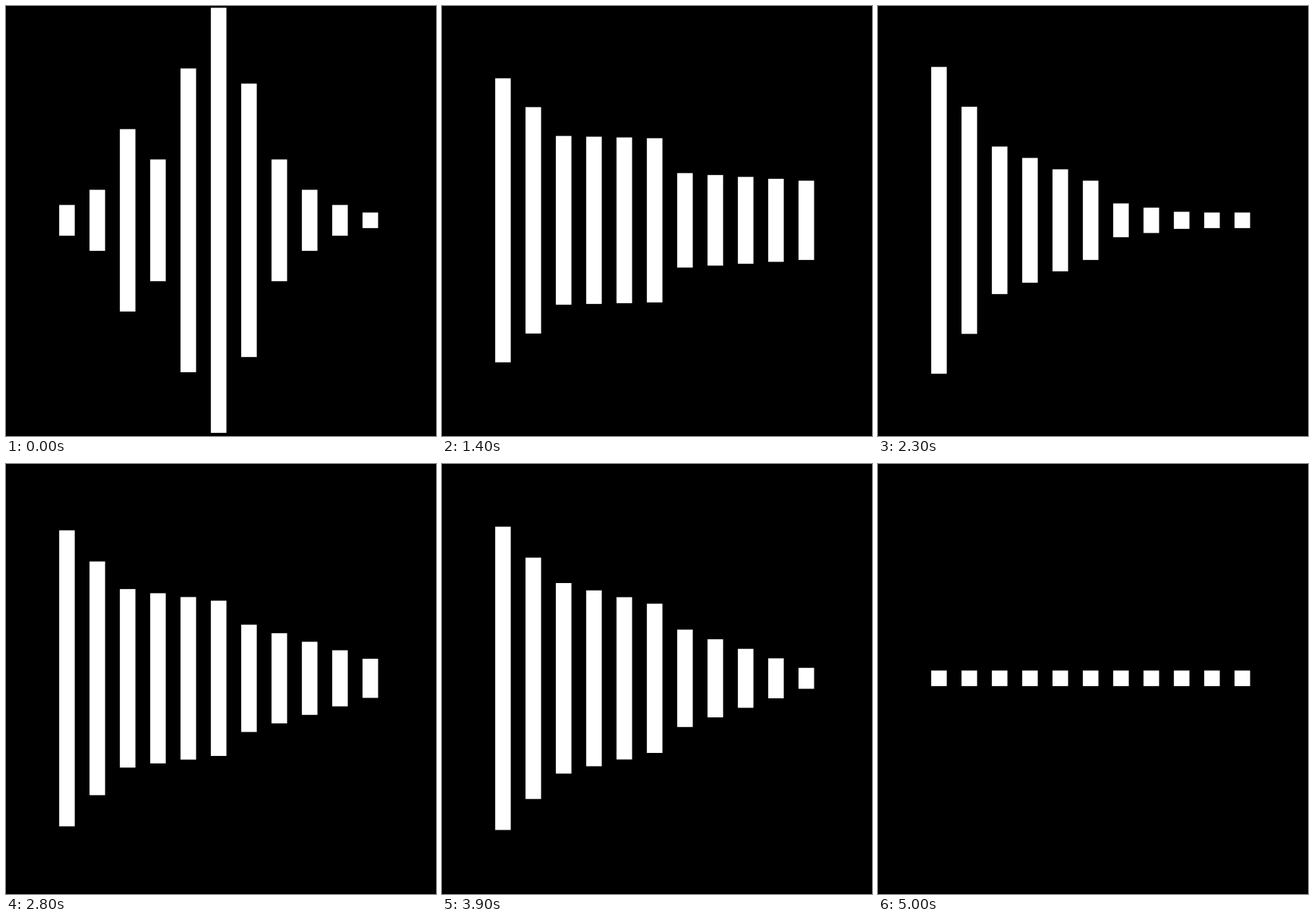
Recreate the animation shown at these times as an HTML page. Size 567x567 px, loop 5.1 s.

```html
<!DOCTYPE html>
<html lang="en">
<head>
<meta charset="utf-8">
<title>Equalizer bars</title>
<style>
html, body { margin: 0; width: 100%; height: 100%; overflow: hidden; background: #000; }
svg { display: block; width: 100%; height: 100%; }
</style>
</head>
<body>
<svg id="stage" viewBox="0 0 567 567" fill="#fff"></svg>
<script>
const LOOP = 5100, STEP = 100;
const LEFT = 70.4, PITCH = 40, UNIT = 10, MID = 282.6, EDGE = 0.25;
const MUSIC_START = 200, FADE_START = 4500, FADE = 0.425, SWELL = 0.025;

// Half-heights of the opening pose, in units
const REST = [2, 4, 12, 8, 20, 28, 18, 8, 4, 2, 1];

// Spectrum outline: half-heights at a few corner bars, at the key times
const CORNERS = [0, 2, 5, 6, 10];
const AVERAGE = [182, 111, 98, 62, 27];
const outlines = [
  [600, [186, 102, 93, 66, 32]],
  [1400, [187, 111, 108, 62, 52]],
  [2000, AVERAGE],
  [2300, [202, 97, 52, 22, 0]],
  [2600, AVERAGE],
  [3400, [177, 118, 105, 88, 16]],
  [4300, [178, 118, 86, 39, 8]],
  [FADE_START, [203, 112, 84, 42, 12]]
];

const mix = (a, b, p) => a + (b - a) * p;

// Index of the segment holding x, and the progress through it
function locate(stops, x) {
  const last = stops.length - 2;
  const k = Math.min(last, Math.max(0, stops.findIndex(s => s > x) - 1));
  const n = x >= stops[last + 1] ? last : k;
  const p = (x - stops[n]) / (stops[n + 1] - stops[n]);
  return [n, Math.min(1, Math.max(0, p))];
}

function outlineAt(values, i) {
  const [k, p] = locate(CORNERS, i);
  return mix(values[k], values[k + 1], p);
}

const times = outlines.map(([time]) => time);

function halfHeight(i, t) {
  if (t < MUSIC_START) return REST[i] * UNIT;
  const [k, p] = locate(times, t);
  const level = mix(outlineAt(outlines[k][1], i), outlineAt(outlines[k + 1][1], i), p);
  // Low bars swell between the key times
  const swell = SWELL * (times[k + 1] - times[k]) * Math.sin(Math.PI * p) / (1 + i);
  const attack = Math.min(1, 0.625 + t / 1600);
  const fade = Math.max(0, t - FADE_START) * FADE;
  return Math.max(UNIT, (level + swell) * attack - fade);
}

const stage = document.getElementById("stage");
const bars = REST.map((_, i) => {
  const bar = document.createElementNS("http://www.w3.org/2000/svg", "rect");
  bar.setAttribute("x", LEFT + i * PITCH - EDGE);
  bar.setAttribute("width", 2 * (UNIT + EDGE));
  return stage.appendChild(bar);
});

function draw(time) {
  const t = Math.floor(time % LOOP / STEP) * STEP;
  bars.forEach((bar, i) => {
    const half = halfHeight(i, t) + EDGE;
    bar.setAttribute("y", MID - half);
    bar.setAttribute("height", 2 * half);
  });
}

const start = performance.now();
function tick() {
  draw(performance.now() - start);
  requestAnimationFrame(tick);
}
tick();
</script>
</body>
</html>
```
